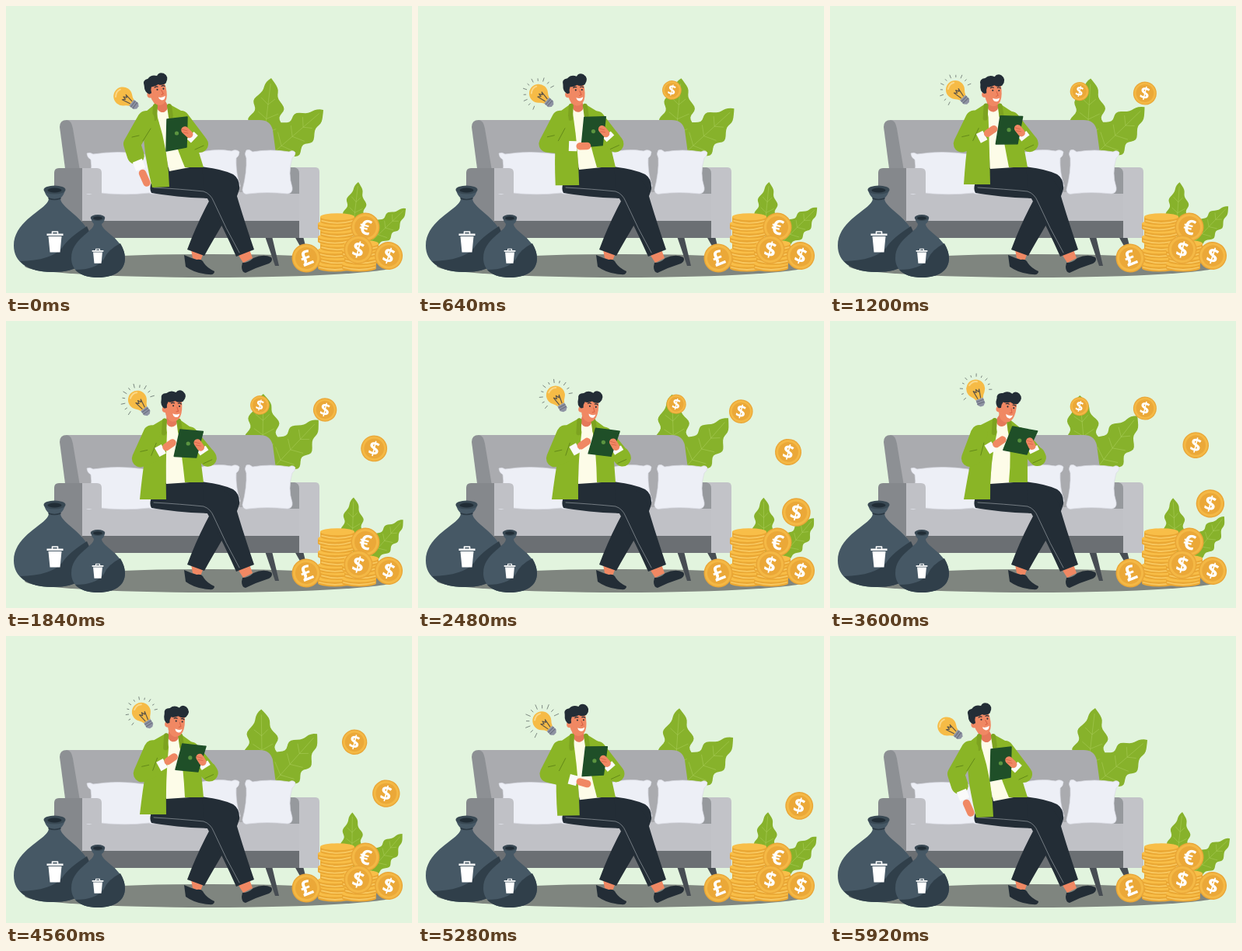
An HTML page for the animation above (6 s loop, 522x370 px).

```html
<!DOCTYPE html>
<html lang="en">
<head>
<meta charset="utf-8">
<title>Man on a sofa with coins</title>
<style>
html, body { margin: 0; width: 100%; height: 100%; overflow: hidden; background: #e2f4de; }
svg { display: block; width: 522px; height: 370px; }
text { font: 700 26px "Open Sans", Arial, sans-serif; fill: #fff; text-anchor: middle; }
.line { fill: none; stroke-linecap: round; stroke-linejoin: round; }
.leaf { fill: #87b22b; }
.vein { stroke: #b4d468; stroke-width: .7; opacity: .6; }
.green { fill: #8ab526; }
.sleeve { stroke: #8ab526; stroke-width: 22; }
.fold { stroke: #5f8418; stroke-width: .9; }
.cuff { stroke: #fafafa; stroke-width: 13; stroke-linecap: butt; }
.hand { stroke: #f08863; stroke-width: 9.5; }
.skin { fill: #f08863; }
.dark { fill: #232d36; }
.pillow { fill: #edeff6; stroke: #dadce4; stroke-width: .7; }
.ray { stroke: #6c7772; stroke-width: .8; }
</style>
</head>
<body>
<svg viewBox="0 0 522 370">
  <defs>
    <g id="disc">
      <circle r="18" fill="#e9a637"/>
      <circle r="16.6" fill="#f4b845"/>
      <circle r="13.6" fill="#eba838"/>
    </g>
    <g id="slab">
      <path d="M-22 0V6A22 4.500 0 0 0 22 6V0Z" fill="#eaa733"/>
      <ellipse rx="22" ry="4.500" fill="#f8be48"/>
      <path class="line" d="M-20 5Q0 11 20 5" stroke="#f8c860" stroke-width="1.800"/>
    </g>
    <g id="bin" fill="#fff">
      <path d="M-8.500-8H8.500L6.500 12.500H-6.500ZM-10.500-11.500H10.500V-9H-10.500Z"/>
      <path class="line" d="M-3.500-11.500V-14H3.500V-11.500" stroke="#fff" stroke-width="1.600"/>
    </g>
  </defs>

  <rect width="522" height="370" fill="#e2f4de"/>
  <ellipse cx="262" cy="335" rx="238" ry="15" fill="#7f857f"/>
  <g id="bigPlant"></g>

  <!-- sofa -->
  <g>
    <path d="M132 296H141L137 312H133ZM333 297H342L351 335H346ZM371 297H382L386 313H380Z" fill="#474d53"/>
    <path d="M69 156Q69 147 78 147H110V240H80Z" fill="#8d9094"/>
    <path d="M78 147H326Q340 147 343 160L347 190L366 210V242H100L86 158Q84 147 78 147Z" fill="#aaabaf"/>
    <path d="M62 215Q62 209 68 209H98V298H98V279H62Z" fill="#85888c"/>
    <path d="M98 240H378V278H98Z" fill="#c0c1c6"/>
    <path d="M98 277H378V299H98Z" fill="#6b6f73"/>
    <path d="M364 208H380V242H364Z" fill="#96999d"/>
    <path d="M371 208H398Q403 208 403 214V299H377V216Q377 209 371 208Z" fill="#c2c3c8"/>
    <path class="pillow" d="M104 190Q108 188 112 191Q144 186 178 191L195 240Q190 244 184 241Q150 245 113 240Q107 245 102 241Q101 237 104 234Q112 214 109 198Q104 195 104 190Z"/>
    <path class="pillow" d="M244 190Q268 183 290 187Q296 184 300 188Q300 193 296 196Q295 214 301 232L295 240H245Z"/>
    <path class="pillow" d="M309 186Q313 184 317 188Q340 184 364 188Q369 185 372 189Q372 193 368 196Q362 216 368 234Q369 241 362 242Q335 239 312 242Q305 244 304 237Q310 214 309 196Q306 190 309 186Z"/>
    <path d="M98 209H117Q123 209 123 215V242H98Z" fill="#c0c1c6"/>
  </g>

  <!-- trash bags -->
  <g>
    <path d="M49 237Q50 243 55 248C55 262 10 275 10 309C10 330 28 343 60 343C92 343 111 330 111 309C111 276 70 262 70 248Q75 243 76 237Z" fill="#465865"/>
    <path d="M111 309C111 330 92 343 60 343C40 343 26 338 18 329Q58 328 72 312Q80 299 104 284Q111 298 111 309Z" fill="#303f4a"/>
    <ellipse cx="62.500" cy="237" rx="14" ry="5.500" fill="#394954"/>
    <ellipse cx="62.500" cy="237.500" rx="9" ry="3" fill="#212d36"/>
    <path d="M55 248Q62 251 70 248" class="line" stroke="#2b3944" stroke-width="1.500"/>
    <use href="#bin" x="63" y="305"/>
    <path d="M109 273Q110 278 113 281C113 291 84 300 84 325C84 341 97 350 118 350C140 350 153 341 153 325C153 301 123 291 123 281Q127 278 127 273Z" fill="#465865"/>
    <path d="M153 325C153 341 140 350 118 350C104 350 94 346 89 340Q116 340 126 326Q131 314 147 306Q153 316 153 325Z" fill="#303f4a"/>
    <ellipse cx="118" cy="273" rx="9.300" ry="4" fill="#394954"/>
    <ellipse cx="118" cy="273.500" rx="6" ry="2.200" fill="#212d36"/>
    <use href="#bin" transform="translate(118 323) scale(.7)"/>
  </g>

  <g id="smallPlant"></g>
  <g id="flying"></g>
  <g id="pile"></g>

  <!-- legs -->
  <path class="skin" d="M238 314L254 318L250 329L240 325ZM298 320L313 314L317 325L305 331Z"/>
  <path class="dark" d="M229 321Q238 325 245 327Q251 326 253 329Q257 337 268 342Q268 347 261 346Q243 345 231 336ZM304 331Q312 331 318 325Q331 319 341 324Q344 328 338 332Q322 337 308 344Q303 343 303 336Z"/>
  <path class="dark" d="M189 224Q196 207 214 208L250 207Q278 210 292 217Q301 223 300 236C294 258 276 284 255 322L233 314Q246 279 263 248Q222 247 187 241Q183 234 189 224Z"/>
  <path class="dark" d="M252 208Q284 212 294 235Q304 270 319 314L296 323Q276 278 256 243Z"/>
  <path class="line" d="M190 234Q225 236 254 239Q263 242 267 252Q283 288 300 318" stroke="#a9b1b5" stroke-width=".6"/>

  <!-- upper body -->
  <path id="shirt" fill="#fdfce8"/>
  <path id="neck" class="line" stroke="#e5795a" stroke-width="14"/>
  <path id="leftPanel" class="green"/>
  <path id="rightPanel" class="green"/>
  <path id="collar" class="line" stroke="#7da320" stroke-width="6"/>
  <g id="head">
    <path class="skin" d="M-11-12H9Q12 2 9 10Q6 17-1 17Q-9 15-11 4Z"/>
    <circle class="skin" cx="-11" cy="2" r="4"/>
    <path class="dark" d="M-12 1Q-18-2-17-11Q-19-18-11-19Q-6-24 1-21Q4-26 10-23Q17-18 11-10Q6-7 1-10Q-4-7-8-8Q-10-4-9 0Z"/>
    <path class="line" d="M-4-6.500Q-2-8 0-7M5-7Q7-8 9-6.500" stroke="#232d36" stroke-width="1.200"/>
    <path class="line" d="M-1-3.500V-3.400M7-3.500V-3.400" stroke="#232d36" stroke-width="2"/>
    <path class="line" d="M4-2L6 3L3.500 4" stroke="#d85f43" stroke-width="1"/>
    <path d="M-1 6.500Q4 8.500 8 6Q7 11 4 11Q0 11-1 6.500Z" fill="#fff"/>
  </g>
  <path id="rightSleeve" class="line sleeve"/>
  <path id="rightFold" class="line fold"/>
  <path id="rightCuff" class="line cuff"/>
  <path id="tablet" fill="#1f4f28" stroke="#1f4f28" stroke-width="1.500" stroke-linejoin="round"/>
  <circle id="badge" r="2.600" fill="#5b9440"/>
  <path id="leftSleeve" class="line sleeve"/>
  <path id="leftFold" class="line fold"/>
  <path id="leftCuff" class="line cuff"/>
  <path id="leftHand" class="line hand"/>
  <path id="rightHand" class="line hand"/>
  <path id="fingers" class="line" stroke="#d9654a" stroke-width=".9"/>

  <g id="bulb">
    <path id="rays" class="line ray"/>
    <path d="M-5 13Q-6 10-9 7A12 12 0 1 1 9 7Q6 10 5 13Z" fill="#f6bb46"/>
    <path d="M-6-8Q0-12 5-9" class="line" stroke="#fbd888" stroke-width="2"/>
    <path class="line" d="M-2 12L-4 1L-1 4L0 0L2 4L4 1L2 12" stroke="#5d5548" stroke-width="1.200"/>
    <path d="M-5 13H5V20L2 23H-2L-5 20Z" fill="#8e93a3"/>
    <path d="M-5 15.500H5M-5 18.500H5" stroke="#686d7d" stroke-width="1"/>
  </g>
</svg>
<script>
const LOOP = 6000, STEP = 80;
const PEAK = 3680, REST = 5920;

// Leaning back, and leaning over the tablet.
const rest = {
  head: [196, 111, -8], collar: [201, 134], bulb: [151, 117, -53],
  shoulderL: [180, 146], elbowL: [162, 178], cuffL: [170, 203], handL: [181, 228],
  shoulderR: [225, 146], elbowR: [249, 178], handR: [230, 160],
  tablet: [207, 146, 233, 143, 232, 182, 206, 187], hem: [188, 234, 210, 233]
};
const work = {
  head: [229, 114, 13], collar: [221, 133], bulb: [188, 88, -20],
  shoulderL: [192, 145], elbowL: [180, 177], cuffL: [206, 164], handL: [222, 153],
  shoulderR: [243, 148], elbowR: [267, 176], handR: [257, 155],
  tablet: [235, 136, 267, 142, 253, 172, 223, 166], hem: [172, 230, 206, 230]
};

const $ = id => document.getElementById(id);
const set = (id, name, value) => $(id).setAttribute(name, value);
const draw = (id, d) => set(id, "d", d);
const mix = (a, b, k) => a.map((v, i) => v + (b[i] - v) * k);
const off = (p, x, y) => [p[0] + x, p[1] + y];
const poly = (...pts) => "M" + pts.map(p => p.join(" ")).join("L");
const clamp = u => Math.min(1, Math.max(0, u));
const smooth = u => { u = clamp(u); return u * u * (3 - 2 * u); };
const glide = u => (clamp(u) + smooth(u)) / 2;

// Wavy leaf whose width swells in the lower half and ends in a point.
function leaf(base, tip, width) {
  const dx = tip[0] - base[0], dy = tip[1] - base[1], len = Math.hypot(dx, dy);
  const edge = (s, side) => {
    const wave = 1 + .17 * Math.sin(s * 22 + side * .8);
    const w = side * width * wave * Math.abs(Math.sin(Math.PI * (.15 + .85 * s))) ** .8;
    return [base[0] + dx * s - dy / len * w, base[1] + dy * s + dx / len * w];
  };
  const pts = [];
  for (let i = 0; i <= 32; i++) pts.push(edge(i / 32, -1));
  for (let i = 32; i >= 0; i--) pts.push(edge(i / 32, 1));
  let veins = poly(base, mix(base, tip, .92));
  for (const s of [.35, .55, .75]) {
    const stem = mix(base, tip, s - .12);
    veins += poly(mix(stem, edge(s, -1), .7), stem, mix(stem, edge(s, 1), .7));
  }
  return `<path class="leaf" d="${poly(...pts)}Z"/><path class="line vein" d="${veins}"/>`;
}

const coin = (x, y, r, sign, tilt) =>
  `<g transform="translate(${x} ${y}) rotate(${tilt}) scale(${r / 18})">` +
  `<use href="#disc"/><text y="9">${sign}</text></g>`;

function buildStill() {
  $("bigPlant").innerHTML = leaf([330, 185], [341, 93], 20) + leaf([338, 194], [408, 134], 21);
  $("smallPlant").innerHTML = leaf([445, 296], [453, 227], 13) + leaf([468, 305], [514, 261], 13);
  const stack = (x, y, n) => Array.from({ length: n }, (_, i) =>
    `<use href="#slab" x="${x + (i % 2 ? 2 : -1)}" y="${y - i * 8.600}"/>`).join("");
  $("pile").innerHTML = stack(424, 332, 8) + stack(455, 332, 4) +
    coin(462, 285, 18.500, "€", 14) + coin(386, 325, 18.500, "£", -22) +
    coin(453, 314, 18.500, "$", 14) + coin(492, 322, 18, "$", 18);
}

function poseAt(t) {
  const lean = t < PEAK ? glide(t / PEAK) : glide((REST - t) / (REST - PEAK));
  const grip = Math.min(smooth(t / 1000), smooth((REST - t) / 1200));
  const body = .8 * lean + .2 * grip;
  const p = { lean, grip };
  for (const part in rest) p[part] = mix(rest[part], work[part], body);
  p.bulb = mix(rest.bulb, work.bulb, lean);
  p.hem = mix(rest.hem, work.hem, grip);

  // The left hand swings out on its way between the seat and the tablet.
  const swing = 4 * grip * (1 - grip);
  const reach = (part, bow) =>
    off(mix(rest[part], off(work[part], (body - 1) * 20, (1 - body) * 10), grip), bow * swing, 0);
  p.cuffL = reach("cuffL", 17);
  p.handL = reach("handL", 22);
  return p;
}

function drawMan(p) {
  const { head, collar: c, hem, tablet: q } = p;
  const left = hem.slice(0, 2), mid = hem.slice(2);
  set("head", "transform", `translate(${head[0]} ${head[1]}) rotate(${head[2]})`);
  draw("neck", poly(off(head, -2, 6), off(c, 0, -4)));
  draw("shirt", poly(off(c, -9, -4), off(c, 9, -4), off(c, 12, 12), [236, 208], off(mid, 0, -20)) + "Z");
  draw("leftPanel", `M${off(c, -9, -8)}L${off(p.shoulderL, 0, -10)}Q${off(p.shoulderL, -9, 20)} ${left}` +
    `L${mid}Q${off(mid, -1, -45)} ${off(c, -6, 10)}Z`);
  draw("rightPanel", `M${off(c, 8, -8)}L${off(p.shoulderR, 2, -10)}L${off(p.shoulderR, 11, 4)}` +
    `L254 208L230 208Q${off(c, 13, 36)} ${off(c, 8, 8)}Z`);
  draw("collar", poly(off(c, -9, -5), off(c, -10, 11)) + poly(off(c, 9, -5), off(c, 11, 9)));

  const cuffR = mix(p.elbowR, p.handR, .5);
  draw("rightSleeve", poly(p.shoulderR, p.elbowR, mix(p.elbowR, p.handR, .15)));
  draw("rightFold", poly(off(p.elbowR, -6, 7), off(p.elbowR, 5, 2)));
  draw("rightCuff", poly(mix(p.elbowR, cuffR, .7), mix(cuffR, p.handR, .25)));
  draw("rightHand", poly(mix(cuffR, p.handR, .4), p.handR));

  draw("leftSleeve", poly(p.shoulderL, p.elbowL, mix(p.elbowL, p.cuffL, .6)));
  draw("leftFold", poly(off(p.elbowL, 0, -9), off(p.elbowL, 9, -11)) +
    poly(off(p.shoulderL, 6, 12), off(p.elbowL, 14, -4)));
  draw("leftCuff", poly(mix(p.elbowL, p.cuffL, .85), mix(p.cuffL, p.handL, .3)));
  draw("leftHand", poly(mix(p.cuffL, p.handL, .5), p.handL));

  draw("tablet", poly(q.slice(0, 2), q.slice(2, 4), q.slice(4, 6), q.slice(6)) + "Z");
  set("badge", "cx", (q[0] + q[4]) / 2);
  set("badge", "cy", (q[1] + q[5]) / 2);
  draw("fingers", poly(off(p.handR, -4, -1), off(p.handR, 3, 1)) +
    poly(off(p.handR, -2, 3), off(p.handR, 4, 4)));
}

function drawBulb([x, y, tilt], glow, t) {
  set("bulb", "transform", `translate(${x} ${y}) rotate(${tilt})`);
  const length = glow * (4.500 + 1.500 * Math.sin(t / 200));
  let d = "";
  for (let i = 0; i < 11 && length > .4; i++) {
    const a = (-200 + i * 22) * Math.PI / 180;
    const at = r => [Math.cos(a) * r, Math.sin(a) * r];
    d += poly(at(17), at(17 + length * (i % 2 ? .6 : 1)));
  }
  draw("rays", d);
}

// Coins leave the tablet every 600 ms and fall along one Bézier arc.
function drawCoins(t) {
  const bezier = (u, a, b, c, d) => {
    const v = 1 - u;
    return a * v ** 3 + 3 * b * u * v * v + 3 * c * u * u * v + d * u ** 3;
  };
  let coins = "";
  for (let i = 0; i < 6; i++) {
    const u = (t - 200 - i * 600) / 2500;
    if (u <= 0 || u >= 1) continue;
    coins += coin(bezier(u, 268, 368, 548, 472), bezier(u, 142, 43, 158, 278), 18.700 * u ** .24, "$", 14);
  }
  $("flying").innerHTML = coins;
}

function render(t) {
  const p = poseAt(t);
  drawMan(p);
  drawBulb(p.bulb, clamp(p.grip * 2), t);
  drawCoins(t);
  set("bigPlant", "transform", `rotate(${-12 * p.lean} 345 190)`);
  set("smallPlant", "transform", `rotate(${-9.500 * p.lean} 455 300)`);
}

const start = performance.now();
function tick() {
  const t = (performance.now() - start) % LOOP;
  render(Math.floor(t / STEP) * STEP);
  requestAnimationFrame(tick);
}
buildStill();
tick();
</script>
</body>
</html>
```
